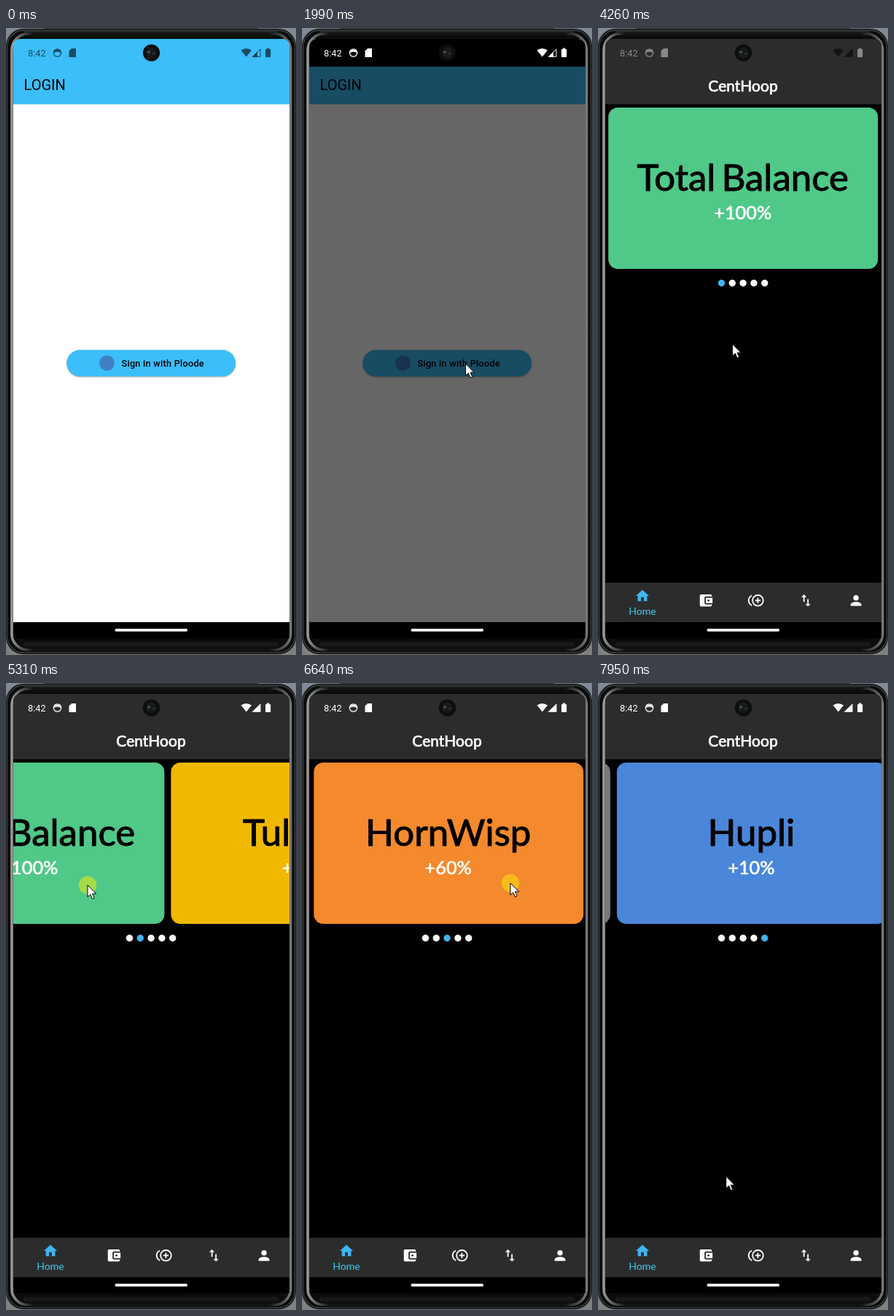
An HTML page with a canvas for the animation above (8000 ms loop, 398x859 px).

```html
<!DOCTYPE html>
<html lang="en">
<head>
<meta charset="utf-8">
<title>Wallet app demo</title>
<style>
html, body { margin: 0; width: 100%; height: 100%; overflow: hidden; background: #000; }
canvas { display: block; width: 398px; height: 859px; }
</style>
</head>
<body>
<canvas id="stage"></canvas>
<script>
const W = 398, H = 859, LOOP = 8000, TICK = 132.6;
const canvas = document.getElementById('stage');
const ctx = canvas.getContext('2d');
const dpr = window.devicePixelRatio || 1;
canvas.width = W * dpr;
canvas.height = H * dpr;

const BLUE = '#3bbef9', ACCENT = '#3fb4ee', BAR = '#2c2c2c', WHITE = '#fff', BLACK = '#000';
const LATO = 'Lato, sans-serif', ROBOTO = 'Roboto, sans-serif';
const PAGE = 379;

const cards = [
  ['Total Balance', '+100%', '#50c888'],
  ['Tulvane', '+80%', '#f0b900'],
  ['HornWisp', '+60%', '#f5892e'],
  ['Orvand', '+40%', '#787878'],
  ['Hupli', '+10%', '#4a86d9']
];

// All times are in ticks
const LOGIN_CLICK = 10, ACCOUNT_CLICK = 22, UNDIM = 28, HOME = 32;
const swipes = [38, 44, 50, 55.1];
const stops = [
  [3, 352, 813], [9, 224.5, 460], [19, 224.5, 460], [25, 177, 431], [UNDIM, 177, 431],
  [HOME, 184.5, 433], [38, 265, 278], [44, 255, 276], [50, 286, 274],
  [57, 280, 275], [60, 185.5, 676]
];

const clamp = v => Math.min(1, Math.max(0, v));
const ramp = (k, from, to) => clamp((k - from) / (to - from));
const easeOut = f => 1 - (1 - f) ** 2;
const settle = t => t > 0 ? 1 - Math.exp(-0.145 * t * t) : 0;

const pageAt = k => swipes.reduce((sum, s) => sum + settle(k - s), 0);
const lightAt = k => ramp(k, 13, 15) - ramp(k, UNDIM, 30) + ramp(k, 30.5, 33);

function pointerAt(k) {
  const i = Math.max(1, stops.findIndex(s => k <= s[0]));
  const [t0, x0, y0] = stops[i - 1], [t1, x1, y1] = stops[i];
  const f = easeOut(ramp(k, t0, t1));
  const drag = swipes.reduce((sum, s) => sum + Math.sin(Math.PI * ramp(k, s, s + 5)), 0);
  return [x0 + (x1 - x0) * f - 155 * drag, y0 + (y1 - y0) * f];
}

function isPressed(k) {
  return k === LOGIN_CLICK || k === ACCOUNT_CLICK || swipes.some(s => k >= Math.floor(s) && k < s + 2.5);
}

function rect(x, y, w, h, color) {
  ctx.fillStyle = color;
  ctx.fillRect(x, y, w, h);
}

function roundPath(x, y, w, h, r) {
  ctx.beginPath();
  ctx.roundRect(x, y, w, h, r);
}

function round(x, y, w, h, r, color) {
  roundPath(x, y, w, h, r);
  ctx.fillStyle = color;
  ctx.fill();
}

function stroke(color, width) {
  ctx.strokeStyle = color;
  ctx.lineWidth = width;
  ctx.stroke();
}

function arc(x, y, r, from, to, color, width) {
  ctx.beginPath();
  ctx.arc(x, y, r, from, to);
  stroke(color, width);
}

function circle(x, y, r, color) {
  ctx.beginPath();
  ctx.arc(x, y, r, 0, Math.PI * 2);
  ctx.fillStyle = color;
  ctx.fill();
}

function poly(color, ...pts) {
  ctx.beginPath();
  pts.forEach(([x, y]) => ctx.lineTo(x, y));
  ctx.closePath();
  ctx.fillStyle = color;
  ctx.fill();
}

function text(str, x, y, font, color, align = 'left', weight = 0, spacing = 0) {
  ctx.font = font;
  ctx.textAlign = align;
  ctx.letterSpacing = spacing + 'px';
  ctx.fillStyle = color;
  ctx.fillText(str, x, y);
  if (weight) {
    ctx.strokeStyle = color;
    ctx.lineWidth = weight;
    ctx.lineJoin = 'round';
    ctx.strokeText(str, x, y);
  }
}

function gradient(x0, y0, x1, y1, ...colors) {
  const g = ctx.createLinearGradient(x0, y0, x1, y1);
  colors.forEach((c, i) => g.addColorStop(i / (colors.length - 1), c));
  return g;
}

// Icons are drawn on a 24-unit grid
const icons = {
  home(c) {
    poly(c, [12, 3], [22, 12], [19, 12], [19, 20], [5, 20], [5, 12], [2, 12]);
    rect(10, 14, 4, 6, BAR);
  },
  wallet(c) {
    round(3, 3, 18, 18, 2, c);
    round(10, 6, 12, 12, 2, BAR);
    rect(12, 8, 10, 8, c);
    circle(16, 12, 1.5, BAR);
  },
  add(c) {
    arc(15, 12, 8, 0, Math.PI * 2, c, 2);
    arc(9, 12, 8, 1.95, 4.33, c, 2);
    rect(11, 11, 8, 2, c);
    rect(14, 8, 2, 8, c);
  },
  swap(c) {
    poly(c, [9, 3], [13, 7], [5, 7]);
    rect(8, 6, 2, 8, c);
    poly(c, [15, 21], [19, 17], [11, 17]);
    rect(14, 10, 2, 8, c);
  },
  person(c) {
    circle(12, 8, 4, c);
    round(4, 14, 16, 6, [{ x: 8, y: 4 }, { x: 8, y: 4 }, 0, 0], c);
  }
};

function icon(name, x, y, color) {
  const s = 22 / 24;
  ctx.save();
  ctx.translate(x - 12 * s, y - 12 * s);
  ctx.scale(s, s);
  icons[name](color);
  ctx.restore();
}

function drawBody() {
  rect(0, 0, W, H, gradient(0, 0, 0, H, '#7f8a96', '#6c6c6c', '#808080'));
  rect(52, 0, 294, 3, '#4a4c4c');
  round(0, 1, 398, 857, 24, '#0b0c0c');
  roundPath(1.5, 3, 395, 853, 23);
  stroke('#3f4142', 1.4);
  rect(24, 4, 350, 5, gradient(0, 4, 0, 9, '#2c2f2e', '#080808'));
  rect(24, 837, 350, 15, gradient(0, 837, 0, 852, '#050505', '#1a1c1c', '#050505'));
  const rim = ctx.createLinearGradient(6, 0, 392, 0);
  rim.addColorStop(0, '#a0a0a0');
  rim.addColorStop(0.08, '#141414');
  rim.addColorStop(0.92, '#141414');
  rim.addColorStop(1, '#7c7c7c');
  roundPath(8, 8, 382.5, 844, 22);
  stroke(rim, 3.6);
}

function drawStatus(k) {
  const light = lightAt(k);
  const shade = m => {
    const v = Math.round(255 * m);
    return `rgba(${v},${v},${v},${0.6 + 0.4 * m})`;
  };
  const ink = shade(light), radio = shade(k === HOME ? 0 : light);

  text('8:42', 30, 38.7, '12.8px ' + ROBOTO, ink);
  arc(70.5, 34, 5.2, 0, Math.PI * 2, ink, 1.3);
  ctx.beginPath();
  ctx.arc(70.5, 34, 4.6, Math.PI, 0);
  ctx.quadraticCurveTo(70.5, 31, 65.9, 34);
  ctx.fillStyle = ink;
  ctx.fill();
  poly(ink, [90, 28], [96, 28], [96, 40], [86.5, 40], [86.5, 31.5]);

  ctx.beginPath();
  ctx.moveTo(329.8, 39.5);
  ctx.lineTo(322.6, 30.6);
  ctx.quadraticCurveTo(329.8, 25.4, 337, 30.6);
  ctx.closePath();
  ctx.fillStyle = radio;
  ctx.fill();
  const bars = k > ACCOUNT_CLICK ? 349.5 : 345;
  poly(radio, [bars, 377.5 - bars], [bars, 39.7], [337.5, 39.7]);
  if (bars < 349) {
    ctx.beginPath();
    ctx.moveTo(349, 29);
    ctx.lineTo(349, 39.2);
    ctx.lineTo(338.8, 39.2);
    ctx.closePath();
    stroke(radio, 1);
  }
  round(356, 29, 7.2, 11, 1, ink);
  rect(358, 27.5, 3.2, 1.5, ink);
}

function drawCamera() {
  circle(199.5, 34, 11.6, '#0c0d0e');
  circle(199.5, 34, 7.5, '#17191b');
  circle(196, 33, 1.8, '#55585b');
  circle(202.5, 35, 1.2, '#3c4043');
}

function drawLogin(k) {
  rect(10, 15, 379, 799, WHITE);
  rect(10, 15, 379, 89.5, BLUE);
  text('LOGIN', 24.5, 85, '20px ' + ROBOTO, BLACK);
  ctx.save();
  ctx.shadowColor = 'rgba(0,0,0,.35)';
  ctx.shadowBlur = 2 * dpr;
  ctx.shadowOffsetY = dpr;
  round(83.3, 441, 231.8, 36.3, 18.15, BLUE);
  ctx.restore();
  circle(138.5, 459, 10.5, '#3f82c4');
  text('Sign in with Ploode', 158.5, 463.6, '500 12.7px ' + ROBOTO, BLACK, 'left', 0, 0.25);

  if (k < UNDIM) {
    const dim = ramp(k, 11, 15);
    rect(10, 53, 379, 761, `rgba(0,0,0,${0.6 * dim})`);
    rect(10, 15, 379, 38, `rgba(0,0,0,${dim})`);
  }
  const shown = ramp(k, 16, 18) - ramp(k, ACCOUNT_CLICK, 24);
  if (shown) drawDialog(k, shown);
}

function drawDialog(k, alpha) {
  ctx.save();
  ctx.globalAlpha = alpha;
  if (k < 19) {
    round(34, 284, 330, 265, 6, WHITE);
    arc(199, 416, 17, k, k + 4.2, '#4285f4', 3);
  } else {
    const small = '12px ' + ROBOTO, body = '14px ' + ROBOTO;
    round(34, 252, 330, 363, 6, WHITE);
    circle(199, 290, 13, BLUE);
    text('Choose an account', 199, 338, '20px ' + ROBOTO, '#222', 'center');
    text('to continue to CentHoop', 199, 362, body, '#555', 'center');
    circle(72, 432, 16, '#7d8f9c');
    text('Demo Account', 102, 437, body, '#222');
    rect(56, 465, 286, 1, '#ddd');
    circle(72, 492, 8, '#666');
    text('Add another account', 102, 497, body, '#222');
    rect(56, 522, 286, 1, '#ddd');
    text('To continue, your name and profile picture', 56, 553, small, '#666');
    text('will be shared with this app.', 56, 571, small, '#666');
  }
  ctx.restore();
}

function drawHome(k) {
  const page = pageAt(k);
  rect(10, 15, 379, 799, BLACK);
  rect(10, 15, 379, 89.5, BAR);
  text('CentHoop', 199, 86.7, '21px ' + LATO, WHITE, 'center', 0.7);

  ctx.wordSpacing = '-5px';
  cards.forEach(([name, gain, color], i) => {
    const x = 14.2 + (i - page) * PAGE;
    round(x, 109, 370, 221, 13, color);
    text(name, x + 184.5, 222.7, '51px ' + LATO, BLACK, 'center', 1);
    text(gain, x + 184.5, 262, '25.3px ' + LATO, WHITE, 'center', 0.7);
  });
  ctx.wordSpacing = '0px';
  const active = Math.floor(page + 0.58);
  cards.forEach((card, i) => circle(169.5 + i * 14.8, 349.5, 4.7, i === active ? ACCENT : WHITE));

  rect(10, 760, 379, 54, BAR);
  icon('home', 61, 778, ACCENT);
  text('Home', 61, 804, '14px ' + LATO, '#3cbcdc', 'center', 0.2);
  ['wallet', 'add', 'swap', 'person'].forEach((name, i) => icon(name, 148 + i * 68.7, 784.3, WHITE));
}

function drawPointer(k) {
  if (k < stops[0][0]) return;
  const [x, y] = pointerAt(k);
  if (isPressed(k)) circle(x, y, 12.3, 'rgba(250,236,10,.5)');
  ctx.save();
  ctx.translate(x, y);
  poly(WHITE, [0, 0], [0, 16.4], [3.8, 12.8], [6.5, 19], [9.2, 17.8], [6.5, 11.9], [11.8, 11.9]);
  stroke(BLACK, 1);
  ctx.restore();
}

function draw(now) {
  const k = Math.floor((now % LOOP + 12) / TICK);
  ctx.setTransform(dpr, 0, 0, dpr, 0, 0);
  drawBody();
  rect(10, 814, 379, 22, BLACK);
  ctx.save();
  roundPath(10, 15, 379, 799, [10, 10, 0, 0]);
  ctx.clip();
  if (k < HOME) drawLogin(k); else drawHome(k);
  drawStatus(k);
  ctx.restore();
  drawCamera();
  round(149.5, 823, 99.5, 3.8, 1.9, WHITE);
  drawPointer(k);
}

const start = performance.now();
function loop() {
  draw(performance.now() - start);
  requestAnimationFrame(loop);
}
loop();
</script>
</body>
</html>
```
